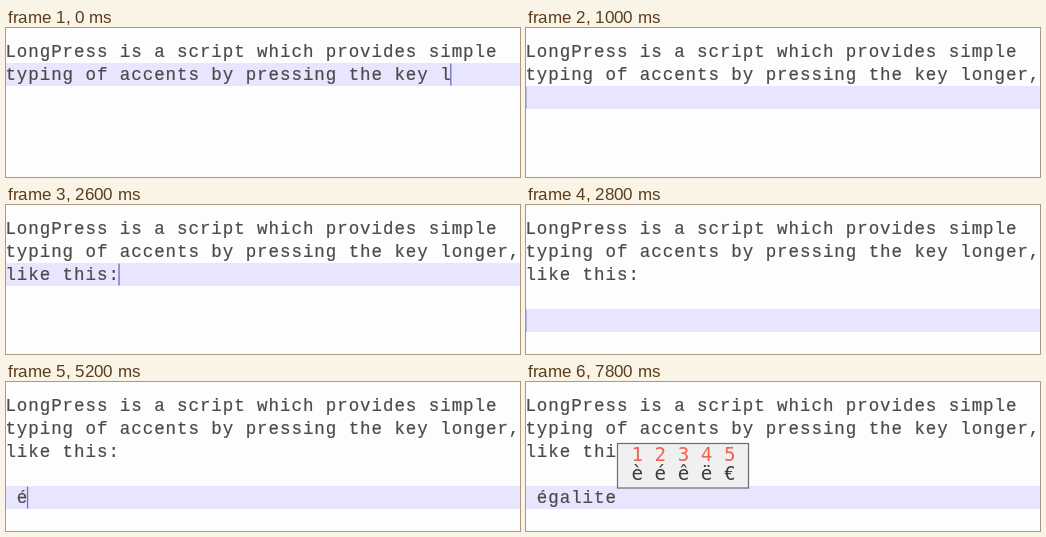
These frames come from a looping animation (514x149 px, 8 s). An HTML page:

```html
<!DOCTYPE html>
<html lang="en">
<head>
<meta charset="utf-8">
<title>Typing accents</title>
<style>
  html, body { margin: 0; width: 100%; height: 100%; overflow: hidden; background: #fefdfe; }
  svg { display: block; width: 514px; height: 149px; }
  text { white-space: pre; }
  .line {
    font: 17.5px "Liberation Mono", monospace; letter-spacing: .94px;
    fill: #4b4a4b; stroke: #4b4a4b; stroke-width: .2px;
  }
  .menu { font: 19.2px "DejaVu Sans Mono", monospace; fill: #3c3c3c; }
  .menu .digits { fill: #ee6352; }
</style>
</head>
<body>
<svg viewBox="0 0 514 149">
  <rect width="514" height="149" fill="#fefdfe"/>
  <rect id="row" width="514" height="23" fill="#e8e6fe"/>
  <g id="lines"></g>
  <rect id="caret" width="1.3" height="22" fill="#716bb8"/>
  <g id="menu" class="menu">
    <rect x=".5" y="61.5" width="131" height="44.5" fill="#f0f0f0" stroke="#6c6c6c" stroke-width="1.2"/>
    <text class="digits" x="14.5" y="79">1 2 3 4 5</text>
    <text x="14.5" y="98">è é ê ë €</text>
  </g>
</svg>
<script>
const LOOP = 8000, TICK = 200;
const LEFT = -1.1, ADVANCE = 11.44, PITCH = 23, TOP = 12, BASE = 29.4;

const START = 'LongPress is a script which provides simple\n' +
              'typing of accents by pressing the key l';

// [ms, typed text]; \b erases the previous character
const KEYS = [
  [200, 'on'], [400, 'g'], [600, 'er'], [800, ','], [1000, '\n'],
  [1400, 'l'], [1600, 'ik'], [1800, 'e '], [2000, 'th'], [2200, 'i'], [2400, 's'], [2600, ':'],
  [2800, '\n\n'], [3400, ' '], [3800, 'e'], [5200, '\bé'],
  [6000, 'g'], [6200, 'al'], [6400, 'i'], [7400, 't'], [7600, 'e']
];
const MENUS = [[4000, 5200], [7800, 8000]];

const $ = id => document.getElementById(id);
const row = $('row'), caret = $('caret'), menu = $('menu');

const lines = Array.from({ length: 5 }, (_, i) => {
  const el = document.createElementNS('http://www.w3.org/2000/svg', 'text');
  el.setAttribute('class', 'line');
  el.setAttribute('x', LEFT + .5);
  el.setAttribute('y', BASE + i * PITCH);
  $('lines').append(el);
  return el;
});

const show = (el, on) => el.setAttribute('visibility', on ? 'visible' : 'hidden');

function typedAt(t) {
  let text = START, last = 0;
  for (const [at, keys] of KEYS) {
    if (at > t) break;
    last = at;
    for (const key of keys) text = key === '\b' ? text.slice(0, -1) : text + key;
  }
  return { rows: text.split('\n'), last };
}

function draw(ms) {
  const t = Math.floor(ms % LOOP / TICK) * TICK;
  const { rows, last } = typedAt(t);
  const n = rows.length - 1;
  const x = LEFT + rows[n].length * ADVANCE;
  const open = MENUS.some(([from, to]) => t >= from && t < to);

  lines.forEach((el, i) => { el.textContent = rows[i] || ''; });
  row.setAttribute('y', TOP + n * PITCH);
  caret.setAttribute('x', Math.max(-.9, x - .9));
  caret.setAttribute('y', TOP + n * PITCH + .5);
  menu.setAttribute('transform', `translate(${Math.ceil(x)} 0)`);
  show(caret, !open && Math.floor((t - last) / 500) % 2 === 0);
  show(menu, open);
}

const begin = performance.now();
function loop() {
  draw(performance.now() - begin);
  requestAnimationFrame(loop);
}
loop();
</script>
</body>
</html>
```
